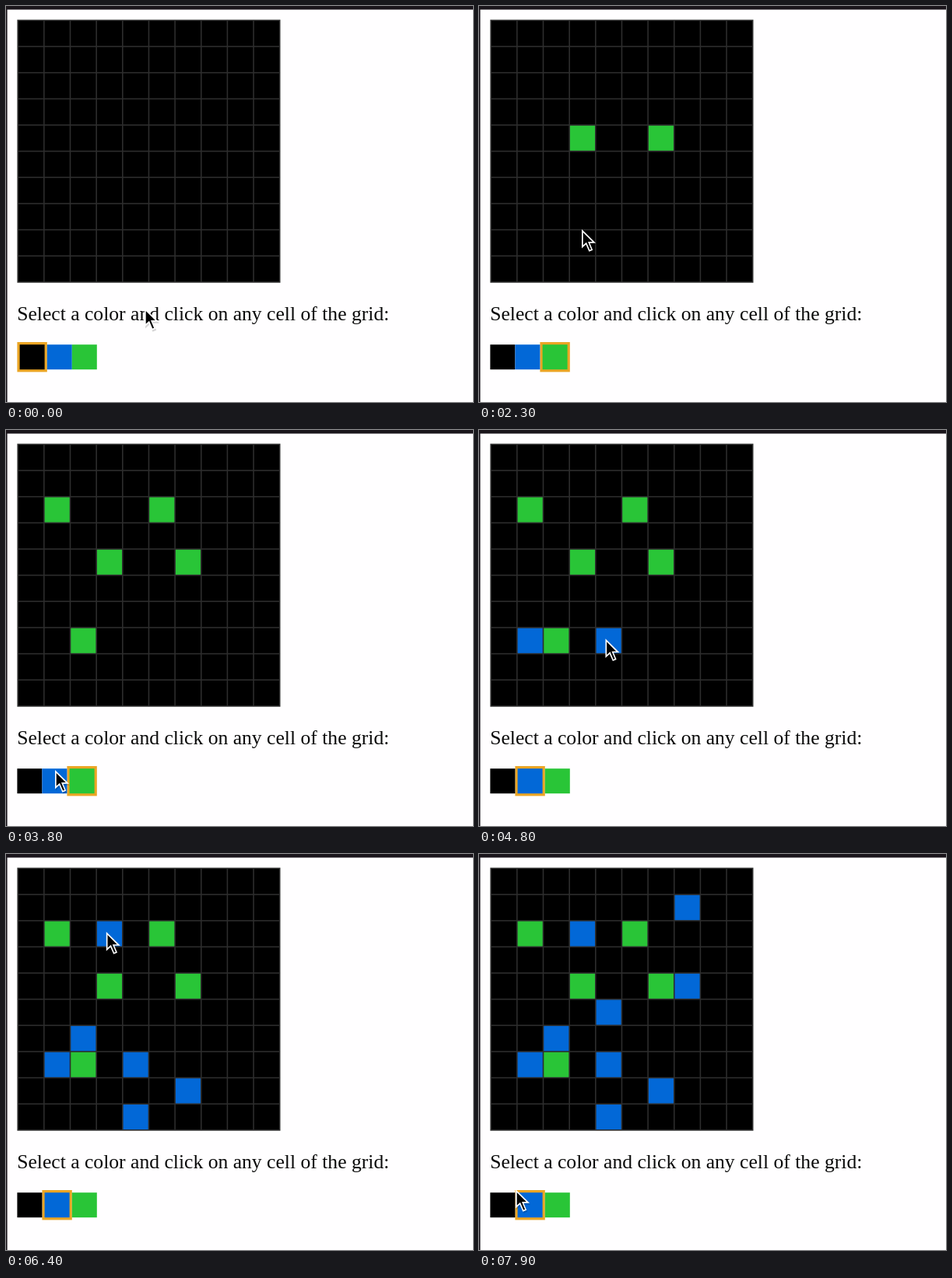
An HTML page that plays this animation: 600 px wide and 509 px high, repeating every 8000 ms.

```html
<!DOCTYPE html>
<html lang="en">
<head>
<meta charset="utf-8">
<title>Grid painter</title>
<style>
  html, body { margin: 0; width: 100%; height: 100%; overflow: hidden; background: #fffeff; }
  svg { display: block; width: 600px; height: 509px; }
  text { font: 25.63px "Liberation Serif", "Times New Roman", serif; fill: #0a0a0a; }
</style>
</head>
<body>
<svg id="stage" viewBox="0 0 600 509">
  <rect width="600" height="509" fill="#fffeff"/>
  <rect width="1.6" height="509" fill="#1a151b"/>
  <rect width="600" height="4.6" fill="#1a151b"/>
  <g id="grid"></g>
  <text x="14.2" y="404">Select a color and click on any cell of the grid:</text>
  <g id="palette"></g>
  <g id="cursor">
    <use href="#arrow" x="1" y="2" opacity=".16"/>
    <path id="arrow" d="M0 0V24.6L5.4 19.6L9.4 28.8L14.2 26.7L10.4 17.8H18Z"/>
    <path d="M1.7 4V20.6L6 16.8L10.2 26.6L12.1 25.7L8 16.1H13.8Z"/>
  </g>
</svg>
<script>
const LOOP = 8000, STEP = 100, PITCH = 33.65, LINE = 1.6, LEFT = 14.4, TOP = 17.6;
const BLACK = '#000', BLUE = '#0268d7', GREEN = '#29c537', ORANGE = '#eba524';
const COLORS = [BLACK, BLUE, GREEN];

// time, column, row of each painted cell
const paints = [
  [1700, 3, 4], [2000, 6, 4], [2600, 2, 7], [3000, 1, 2], [3400, 5, 2],
  [4600, 1, 7], [4800, 4, 7], [5000, 6, 8], [5400, 4, 9], [6000, 2, 6],
  [6400, 3, 2], [6700, 7, 1], [6900, 7, 4], [7400, 4, 5]
];

// time, selected swatch
const picks = [[0, 0], [800, 2], [4000, 1]];

// time, x, y of the pointer between clicks
const moves = [
  [0, 178, 388], [100, 168, 395], [300, 108, 443], [400, 98, 451], [1000, 97, 450],
  [1300, 107.5, 436], [1500, 136, 160], [2300, 132, 287], [3800, 63, 437],
  [3900, 61, 448], [4100, 62, 445], [4300, 62, 294], [4400, 61, 273],
  [5800, 95, 220], [7100, 259, 171.5], [7900, 47, 431]
];

const clicks = paints.map(([t, col, row]) =>
  [t, LEFT + (col + 0.4) * PITCH, TOP + (row + 0.45) * PITCH]);
const path = [...moves, ...clicks].sort((a, b) => a[0] - b[0]);

const byId = id => document.getElementById(id);

function addRect(parent, x, y, width, height, fill) {
  const el = document.createElementNS('http://www.w3.org/2000/svg', 'rect');
  const attrs = { x, y, width, height, fill };
  for (const name in attrs) el.setAttribute(name, attrs[name]);
  return parent.appendChild(el);
}

const grid = byId('grid'), palette = byId('palette'), cursor = byId('cursor');
const side = 10 * PITCH + LINE, inner = PITCH - LINE;
byId('arrow').style.fill = 'inherit';
cursor.querySelectorAll('path')[0].style.fill = '#fff';
cursor.querySelector('use').remove();

const shadow = byId('arrow').cloneNode();
shadow.removeAttribute('id');
shadow.style.fill = BLACK;
shadow.setAttribute('opacity', 0.16);
shadow.setAttribute('transform', 'translate(1 2)');
cursor.prepend(shadow);

addRect(grid, LEFT, TOP, side, side, '#2d2d2d');
const cells = [];
for (let i = 0; i < 100; i++) {
  const x = LEFT + LINE + (i % 10) * PITCH;
  const y = TOP + LINE + Math.floor(i / 10) * PITCH;
  cells.push(addRect(grid, x, y, inner, inner, BLACK));
}

const frame = addRect(palette, 0, 432, 38.4, 38.4, ORANGE);
const swatches = COLORS.map(color => addRect(palette, 0, 435.2, 32, 32, color));

const pickAt = t => picks.filter(pick => pick[0] <= t).pop()[1];

function pointerAt(t) {
  const i = path.findIndex(key => key[0] > t);
  if (i < 0) return path[path.length - 1].slice(1);
  const [t0, x0, y0] = path[i - 1], [t1, x1, y1] = path[i];
  const k = (t - t0) / (t1 - t0), ease = k * k * (3 - 2 * k);
  return [x0 + (x1 - x0) * ease, y0 + (y1 - y0) * ease];
}

function drawPalette(picked) {
  let x = LEFT;
  swatches.forEach((swatch, i) => {
    const pad = i === picked ? 3.2 : 0;
    if (pad) frame.setAttribute('x', x);
    swatch.setAttribute('x', x + pad);
    x += 32 + 2 * pad;
  });
}

function draw(time) {
  const t = Math.floor((time % LOOP) / STEP) * STEP;
  for (const [at, col, row] of paints) {
    cells[row * 10 + col].setAttribute('fill', t >= at ? COLORS[pickAt(at)] : BLACK);
  }
  drawPalette(pickAt(t));
  cursor.setAttribute('transform', `translate(${pointerAt(t)})`);
}

let start;
function tick(now) {
  start ??= now;
  draw(Math.max(0, now - start));
  requestAnimationFrame(tick);
}
draw(0);
requestAnimationFrame(tick);
</script>
</body>
</html>
```
